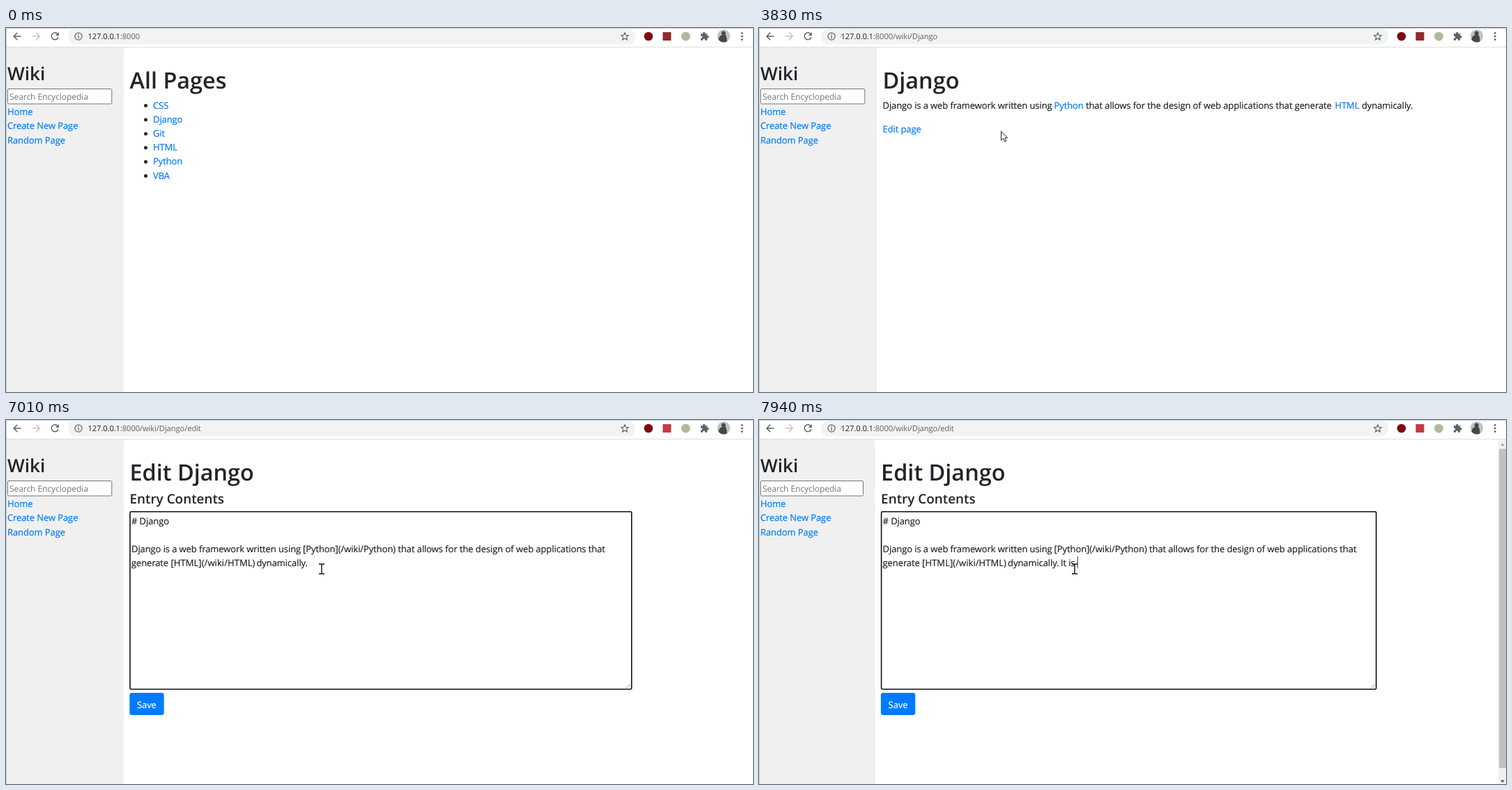
Animation of 1072x523 px, one loop 8 s. Source, as an HTML page:

```html
<!DOCTYPE html>
<html lang="en">
<head>
<meta charset="utf-8">
<title>Wiki</title>
<style>
html, body { margin: 0; width: 100%; height: 100%; overflow: hidden; background: #fff; }
svg { display: block; width: 1072px; height: 523px; }
text { font: 13px "Open Sans", "Noto Sans", sans-serif; letter-spacing: -.1px; fill: #212529; stroke: #212529; stroke-width: .2; white-space: pre; text-rendering: geometricPrecision; }
text.h1, text.h2, text.h3 { font-weight: 600; letter-spacing: 0; stroke: none; }
text.h1 { font-size: 32.4px; }
text.h2 { font-size: 26.2px; }
text.h3 { font-size: 18.9px; }
text.hint { font-size: 12.1px; fill: #757575; stroke: none; }
text.url { font-size: 11.2px; fill: #202124; stroke: none; }
.url tspan { fill: #5f6368; }
text.white { fill: #fff; stroke: #fff; }
.link { fill: #007bff; stroke: #007bff; }
.link.hover { fill: #0056b3; stroke: #0056b3; text-decoration: underline; }
.icon { fill: none; stroke: #5f6368; stroke-width: 1.5; }
.pointer { fill: #fff; stroke: #222; stroke-width: 1; stroke-linejoin: round; }
</style>
</head>
<body>
<svg viewBox="0 0 1072 523">
  <rect width="1072" height="523" fill="#fff"/>
  <rect id="side" y="28" height="495" fill="#f0f0f0"/>

  <!-- toolbar -->
  <rect x="89" y="1" width="814" height="22.5" rx="11.2" fill="#f1f3f4"/>
  <rect y="27" width="1072" height="1" fill="#dfe0e2"/>
  <rect width="1072" height="1" fill="#cfcfcf"/>
  <rect width="1" height="523" fill="#c9c9c9"/>
  <path class="icon" d="M21.5 12H11.5M16.3 6.8L11.1 12L16.3 17.2"/>
  <path class="icon" style="stroke:#c4c6c8" d="M37.5 12H48M43 6.8L48.2 12L43 17.2"/>
  <g id="reload">
    <path class="icon" d="M74.2 8.6A5 5 0 1 0 75 13.2"/>
    <path d="M75.8 6V11H70.8Z" fill="#5f6368"/>
  </g>
  <path id="stop" class="icon" d="M65.5 7.5L74.5 16.5M74.5 7.5L65.5 16.5"/>
  <circle class="icon" cx="104" cy="12" r="5.1" style="stroke-width:1.2"/>
  <path class="icon" d="M104 11.3V15M104 8.8V10.2" style="stroke-width:1.3"/>
  <text class="url" x="117.5" y="16.2">127.0.0.1<tspan id="path"></tspan></text>
  <path class="icon" style="stroke-width:1.2" d="M888 6.8L889.5 10.3L893.3 10.6L890.4 13.1L891.3 16.9L888 14.9L884.7 16.9L885.6 13.1L882.7 10.6L886.5 10.3Z"/>
  <circle cx="922" cy="12" r="6.3" fill="#7d0a12"/>
  <rect id="badge" x="942.5" y="6" width="12" height="12"/>
  <circle cx="975.5" cy="12" r="6.5" fill="#b3b99e"/>
  <path fill="#5f6368" d="M997 8.2H1000V7.4A1.7 1.7 0 0 1 1003.4 7.4V8.2H1006.3V11.1H1007A1.7 1.7 0 0 1 1007 14.5H1006.3V17.7H1003.2V17A1.6 1.6 0 0 0 1000 17V17.7H997V14.7H997.6A1.6 1.6 0 0 0 997.6 11.4H997Z"/>
  <circle cx="1030" cy="11.5" r="9.3" fill="#b9c8ce"/>
  <path fill="#4a4643" d="M1022.5 17Q1023 10.5 1028 10A3 3 0 1 1 1032 9.5Q1035 12 1034.5 19.6Q1028 22.5 1022.5 17Z"/>
  <g fill="#5f6368"><circle cx="1056.3" cy="7.3" r="1.4"/><circle cx="1056.3" cy="12" r="1.4"/><circle cx="1056.3" cy="16.7" r="1.4"/></g>

  <!-- sidebar -->
  <text class="h2" x="2" y="75.2">Wiki</text>
  <rect id="search" x="2.5" y="87.5" height="21.5" rx="1.5" fill="#fff" stroke="#767676"/>
  <text class="hint" x="5" y="103.3">Search Encyclopedia</text>
  <text class="link" x="2" y="125.2">Home</text>
  <text class="link" x="2" y="145.3">Create New Page</text>
  <text class="link" x="2" y="165.5">Random Page</text>

  <!-- pages -->
  <g id="main">
    <g id="list"><text class="h1" x="177.5" y="87.3">All Pages</text></g>
    <g id="view">
      <text class="h1" x="177.5" y="87.3">Django</text>
      <text x="177.5" y="115.6">Django is a web framework written using <tspan class="link" x="423.5">Python</tspan><tspan x="469">that allows for the design of web applications that generate</tspan><tspan class="link" x="826.5">HTML</tspan><tspan x="865">dynamically.</tspan></text>
      <text id="editLink" class="link" x="177.5" y="149.5">Edit page</text>
    </g>
    <g id="edit">
      <text class="h1" x="177.5" y="87.3">Edit Django</text>
      <text class="h3" x="177.5" y="119.8">Entry Contents</text>
      <rect id="area" fill="#fff"/>
      <path id="grip" d="M0 6L6 0M3.5 6L6 3.5" stroke="#888" stroke-width=".8"/>
      <text x="180" y="149.6">#&#32;Django</text>
      <text x="180" y="189.6">Django is a web framework written using <tspan x="426" style="letter-spacing:-.08px">[Python](/wiki/Python) that allows for the design of web applications that</tspan></text>
      <text x="180" y="209.8">generate <tspan x="236.5" style="letter-spacing:.06px">[HTML](/wiki/HTML)</tspan><tspan x="359.5">dynamically.</tspan><tspan id="typed" x="432"></tspan></text>
      <rect id="caret" y="196" width="1" height="17" fill="#333"/>
      <rect x="177.3" y="392" width="49.4" height="32" rx="3.4" fill="#007bff"/>
      <text class="white" x="188" y="413.6">Save</text>
    </g>
  </g>

  <g id="bar">
    <rect x="1061" y="28" width="11" height="495" fill="#f1f1f1"/>
    <rect x="1062" y="41.5" width="10" height="458.5" fill="#c1c1c1"/>
    <path d="M1064 37H1070L1067 33.5Z" fill="#a3a3a3"/>
    <path d="M1064 517.5H1070L1067 521Z" fill="#505050"/>
  </g>
  <rect id="status" y="522" height="1" fill="#bdbdbd"/>

  <!-- pointer -->
  <circle id="click" r="9" fill="#f5e51b" opacity=".7"/>
  <path id="arrow" class="pointer" d="M.5 .5V13.3L3.5 10.6L5.6 15.4L7.8 14.5L5.7 9.8H9.7Z"/>
  <path id="hand" class="pointer" d="M-1.4 11V1.6Q-1.4 .4 -.2 .4Q1 .4 1 1.6V6.4Q2.4 5.3 3.5 6.8Q5 6 5.9 7.4Q7.9 6.8 7.9 9V12.5Q7.9 15.2 6.2 17.4H-.2Q-1.6 14.8 -4 12.3Q-5.2 10.6 -3.8 9.8Q-2.8 9.4 -1.4 11Z"/>
  <path id="beam" d="M-4 -7H-1Q0 -7 0 -6Q0 -7 1 -7H4M0 -6V6M-4 7H-1Q0 7 0 6Q0 7 1 7H4" fill="none" stroke="#111" stroke-width="1.4"/>
</svg>
<script>
const LOOP = 8000;
const $ = id => document.getElementById(id);
const NS = "http://www.w3.org/2000/svg";

function add(parent, tag, attrs, content = "") {
  const el = document.createElementNS(NS, tag);
  set(el, attrs);
  el.textContent = content;
  return parent.appendChild(el);
}
function set(el, attrs) {
  for (const k in attrs) el.setAttribute(k, attrs[k]);
}
const show = (id, on) => $(id).style.display = on ? "" : "none";
const during = (t, a, b) => t >= a && t < b;

const items = ["CSS", "Django", "Git", "HTML", "Python", "VBA"].map((name, i) => {
  const y = 111 + 20.2 * i;
  add($("list"), "circle", { cx: 200.5, cy: y + .5, r: 2.5, fill: "#212529" });
  return add($("list"), "text", { x: 211, y: y + 4.6, class: "link" }, name);
});

// Pointer moves: start, end, steps, from, to and an optional bend
const moves = [
  [150, 310, 4, [992, 538], [817, 446]],
  [640, 800, 3, [817, 446], [566, 313]],
  [1040, 1180, 3, [566, 313], [279, 206]],
  [1480, 1720, 4, [279, 206], [222, 141]],
  [1800, 1870, 2, [222, 141], [221, 131]],
  [3340, 3830, 7, [221, 131], [347, 148], [270, 100]],
  [4000, 4760, 11, [347, 148], [227, 148]],
  [4820, 4820, 1, [227, 148], [223, 148]],
  [5700, 6310, 9, [223, 148], [453, 214]]
];

function pointerAt(t) {
  const m = moves.filter(m => t >= m[0]).pop();
  if (!m) return null;
  const [a, b, n, from, to, bend] = m;
  const step = n > 1 ? Math.min(n - 1, Math.floor((t - a) / (b - a) * (n - 1) + .01)) : 0;
  const u = (step + 1) / n;
  return from.map((p, i) => {
    const c = bend ? bend[i] : (p + to[i]) / 2;
    return p * (1 - u) ** 2 + 2 * c * u * (1 - u) + to[i] * u * u;
  });
}

const TEXT = " It is ";
const keys = [7170, 7390, 7630, 7710, 7790, 7870, 7940];

function draw(t) {
  const page = t < 2570 ? "list" : t < 5230 ? "view" : "edit";
  for (const id of ["list", "view", "edit"]) show(id, id === page);
  $("path").textContent = ":8000" + (t < 2500 ? "" : t < 5160 ? "/wiki/Django" : "/wiki/Django/edit");
  const loading = during(t, 2500, 2640) || during(t, 5160, 5380);
  show("reload", !loading);
  show("stop", loading);
  set($("badge"), { fill: page === "edit" ? "#c23a42" : "#8f2a2c" });

  const typed = keys.filter(k => t >= k).length;
  const narrow = during(t, 2430, 2500) || during(t, 5070, 5160) || typed % 2 === 1;
  show("bar", narrow);
  set($("main"), { transform: `translate(${narrow ? -2.4 : 0} 0)` });
  set($("side"), { width: narrow ? 166.5 : 169 });
  set($("search"), { width: narrow ? 147 : 149.3 });

  // Text area: plain, hovered, focused
  const focus = t >= 6470;
  const line = focus ? 1.6 : 1, edge = focus ? line / 2 : 1.5;
  set($("area"), {
    x: 177.2 + edge, y: 130.9 + edge, rx: focus ? 1.5 : 0,
    width: (narrow ? 711.7 : 721.4) - 2 * edge, height: 256.6 - 2 * edge,
    stroke: focus ? "#101010" : t >= 5700 ? "#4f4f4f" : "#767676",
    "stroke-width": line
  });
  set($("grip"), { transform: `translate(${narrow ? 880.5 : 890} 379)` });
  $("typed").textContent = TEXT.slice(0, typed);
  set($("caret"), { x: 432 + (typed ? $("typed").getComputedTextLength() : 0) });
  show("caret", during(t, 6550, 7010) || typed > 0);

  show("status", during(t, 2050, 2960) || during(t, 5070, 5700));
  set($("status"), { width: t < 4000 ? 127 : 150 });

  const p = pointerAt(t);
  const onItem = during(t, 1800, 2570);
  const onEdit = page === "view" && t >= 4000 && p[0] < 233.5;
  items[1].classList.toggle("hover", onItem);
  $("editLink").classList.toggle("hover", onEdit);
  const overText = t >= 5700 || (during(t, 3340, 4000) && p[1] < 124);
  const kind = !p ? "" : onItem || onEdit ? "hand" : overText ? "beam" : "arrow";
  for (const id of ["arrow", "hand", "beam"]) {
    show(id, id === kind);
    if (p) set($(id), { transform: `translate(${p[0]} ${p[1]})` });
  }
  show("click", during(t, 2430, 2570) || during(t, 5070, 5230) || during(t, 6470, 6630));
  if (p) set($("click"), { cx: p[0], cy: p[1] });
}

const start = performance.now();
function tick() {
  draw((performance.now() - start) % LOOP);
  requestAnimationFrame(tick);
}
draw(0);
requestAnimationFrame(tick);
</script>
</body>
</html>
```
